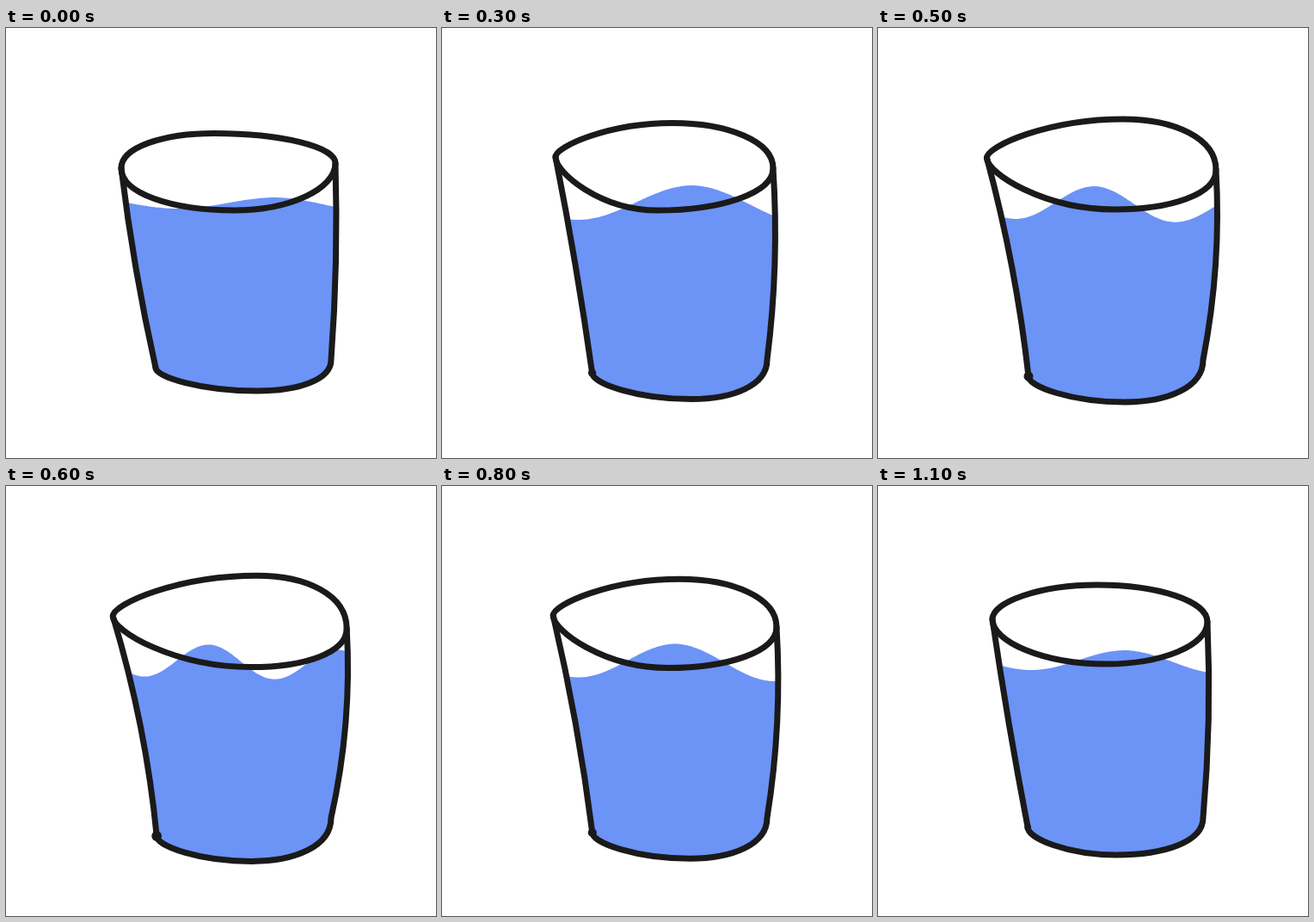
Animation of 500 by 500 pixels, one loop 1.21 s. Source, as an HTML page with a canvas:

```html
<!DOCTYPE html>
<html lang="en">
<head>
<meta charset="utf-8">
<title>Glass of water</title>
<style>
  html, body { margin: 0; width: 100%; height: 100%; overflow: hidden; background: #fff; }
  canvas { display: block; width: 500px; height: 500px; }
</style>
</head>
<body>
<canvas id="stage" width="500" height="500"></canvas>
<script>
const ctx = document.getElementById('stage').getContext('2d');
const INK = '#1a1a1a', WATER = '#6c93f6', PEN = 7;
const STEP = 100, LOOP = 1210, LAST = 11, TURN = 6;
const OVERSHOOT = 1.4;

// The four extremes of the rim, the lowest point of the base,
// and one crest and trough of the water wave
const poses = [
  { at: 0, left: [134, 163], top: [242, 122.5], right: [383, 157], low: [265, 212], base: [292, 422],
    crest: [315, 197], trough: [200, 210] },
  { at: 1, left: [133, 155], top: [255, 115], right: [383, 158], low: [265, 207], base: [277, 429],
    crest: [288, 191], trough: [178, 214] },
  { at: 3, left: [132, 150], top: [268, 110.5], right: [385, 163], low: [250, 212], base: [290, 431.5],
    crest: [292, 183], trough: [158, 223] },
  { at: 5, left: [126.5, 151], top: [285, 106], right: [393, 165], low: [275, 211], base: [287, 435],
    crest: [252, 184], trough: [160, 222] }
];

const mix = (a, b, k) => a + (b - a) * k;

function poseAt(p) {
  let i = 0;
  while (i < poses.length - 2 && poses[i + 1].at < p) i++;
  const a = poses[i], b = poses[i + 1];
  const k = Math.min(OVERSHOOT, (p - a.at) / (b.at - a.at));
  const pose = {};
  for (const name in a) {
    if (name !== 'at') pose[name] = a[name].map((v, n) => mix(v, b[name][n], k));
  }
  // Parts that drift steadily as the glass stretches
  pose.footL = [174 + p * 0.2, 395 + p * 2];
  pose.footR = [378, 386];
  pose.bendL = 1.6 * p - 3;
  pose.bendR = 3 + 0.8 * p;
  pose.roundL = Math.max(0.3, 0.6 - 0.1 * p);
  pose.roundR = 0.55 + 0.015 * p;
  return pose;
}

// Quarter ovals between a side point (upright tangent) and a pole (level tangent)
const handles = (side, pole, round) => [
  [side[0], mix(side[1], pole[1], round)],
  [mix(pole[0], side[0], 0.55), pole[1]]
];

function toPole(path, side, pole, round) {
  const [s, p] = handles(side, pole, round);
  path.bezierCurveTo(...s, ...p, ...pole);
}

function toSide(path, side, pole, round) {
  const [s, p] = handles(side, pole, round);
  path.bezierCurveTo(...p, ...s, ...side);
}

// Wall from a to b, pushed sideways by bend at its middle
function wall(path, a, b, bend) {
  path.quadraticCurveTo((a[0] + b[0]) / 2 + 2 * bend, (a[1] + b[1]) / 2, ...b);
}

function rimPath(g) {
  const path = new Path2D();
  path.moveTo(...g.left);
  toPole(path, g.left, g.top, g.roundL);
  toSide(path, g.right, g.top, g.roundR);
  toPole(path, g.right, g.low, g.roundR);
  toSide(path, g.left, g.low, g.roundL);
  path.closePath();
  return path;
}

function bodyPath(g) {
  const path = new Path2D();
  path.moveTo(...g.left);
  wall(path, g.left, g.footL, g.bendL);
  toPole(path, g.footL, g.base, 0.4);
  toSide(path, g.footR, g.base, 0.65);
  wall(path, g.footR, g.right, g.bendR);
  return path;
}

// Cosine wave between crest and trough, sinking slightly to the right
function waterPath({ crest, trough }) {
  const path = new Path2D();
  path.moveTo(100, 500);
  for (let x = 100; x <= 420; x += 2) {
    const phase = Math.PI * (x - crest[0]) / (crest[0] - trough[0]);
    const sink = 0.04 * Math.max(0, x - crest[0]);
    path.lineTo(x, mix(crest[1], trough[1], (1 - Math.cos(phase)) / 2) + sink);
  }
  path.lineTo(420, 500);
  return path;
}

function draw(p) {
  const glass = poseAt(p);
  const body = bodyPath(glass);

  ctx.fillStyle = '#fff';
  ctx.fillRect(0, 0, 500, 500);

  ctx.save();
  ctx.clip(body);
  ctx.fillStyle = WATER;
  ctx.fill(waterPath(glass));
  ctx.restore();

  ctx.strokeStyle = ctx.fillStyle = INK;
  ctx.lineCap = ctx.lineJoin = 'round';
  ctx.lineWidth = PEN;
  ctx.stroke(body);
  ctx.stroke(rimPath(glass));

  // Blob of ink where the left wall meets the base
  ctx.beginPath();
  ctx.arc(...glass.footL, PEN / 2 + 0.4 * p, 0, Math.PI * 2);
  ctx.fill();
}

const start = performance.now();
function tick() {
  const t = (performance.now() - start) % LOOP;
  const n = Math.min(LAST, Math.floor(t / STEP));
  draw(TURN - Math.abs(TURN - n));
  requestAnimationFrame(tick);
}
tick();
</script>
</body>
</html>
```
